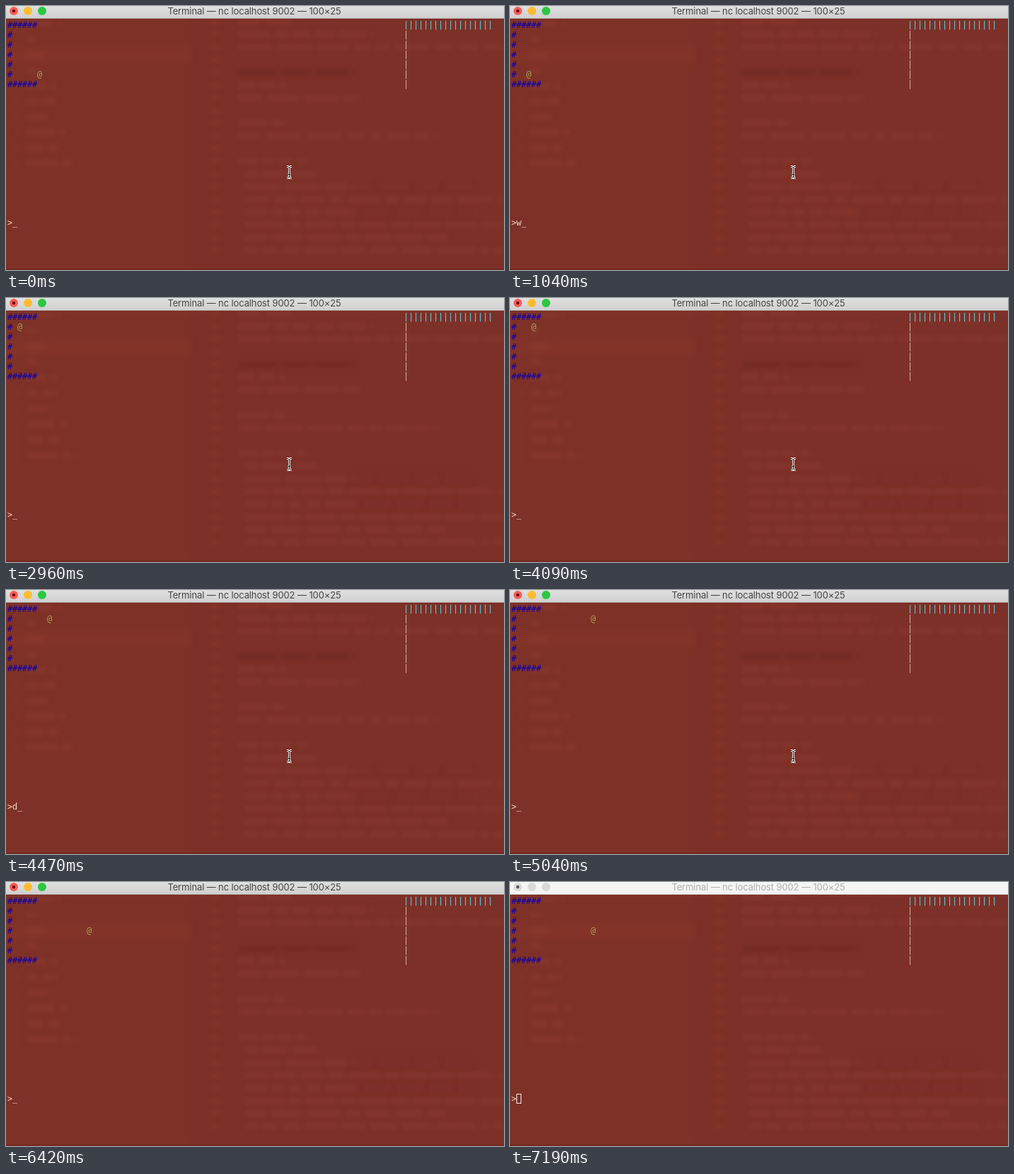
Animation, 704 px wide and 374 px high, one loop 7290 ms. Source, as an HTML page with a canvas:

```html
<!DOCTYPE html>
<html lang="en">
<head>
<meta charset="utf-8">
<title>Terminal</title>
<style>
  html, body { margin: 0; overflow: hidden; background: #7d3027; }
  canvas { display: block; }
</style>
</head>
<body>
<canvas id="stage" width="704" height="374"></canvas>
<script>
const W = 704, H = 374, LOOP = 7290;
const ctx = document.getElementById('stage').getContext('2d');
const MONO = '12px "DejaVu Sans Mono", monospace';
const STEP = { a: [-1, 0], d: [1, 0], w: [0, -1], s: [0, 1] };

// Player moves: [time, key]; a held key repeats at a fixed period.
const held = (start, period, count, key) =>
  Array.from({ length: count }, (_, i) => [start + i * period, key]);
const moves = [
  [420, 'a'], [590, 'a'], [740, 'a'], [1450, 'w'], [1690, 'w'],
  [1870, 'w'], [2040, 'w'], [2490, 'd'], [2780, 'a'], [2960, 'a'],
  [3190, 'a'], [3370, 'd'], [3550, 'd'],
  ...held(4090, 80, 5, 'd'), ...held(4520, 66, 11, 'd'),
  [5350, 's'], [5530, 's'], [5770, 'a'], [5950, 'a'], [6130, 'a']
];

// Short-lived states: [from, to, value]
const typed = [[360, 420, 'a'], [560, 590, 'a'], [1040, 1100, 'w'],
  [3490, 3550, 'd'], [4470, 4520, 'd']];
const newline = [[1510, 1570, 'w'], [4652, 4700, 'd'], [5590, 5650, 's']];
const blank = [[1570, 1630, 1], [4700, 4750, 1], [5240, 5290, 1], [5650, 5710, 1]];
const active = (list, t) => (list.find(([a, b]) => t >= a && t < b) || [])[2];

function put(text, col, row, color) {
  ctx.font = MONO;
  ctx.fillStyle = color;
  [...text].forEach((ch, i) => ctx.fillText(ch, 2 + 7 * (col + i), 31 + 14 * row));
}

function makeBackdrop() {
  const layer = document.createElement('canvas');
  layer.width = W;
  layer.height = H;
  const g = layer.getContext('2d');
  let seed = 9;
  const rnd = () => (seed = seed * 16807 % 2147483647) / 2147483647;
  const rect = (x, y, w, h, color) => { g.fillStyle = color; g.fillRect(x, y, w, h); };
  const words = (x, end, y, color) => {
    while (x < end) {
      const w = Math.min(12 + rnd() * 44, end - x);
      rect(x, y - 4, w, 8, color);
      x += w + 6;
    }
  };
  rect(0, 0, W, H, '#7d3027');
  g.filter = 'blur(3px)';
  rect(-9, 0, 272, H + 9, 'rgba(140,58,46,.12)');
  rect(-9, 57, 271, 25, 'rgba(150,60,48,.22)');
  [76, 42, 56, 44, 72, 72, 60, 85, 75, 103].forEach((end, i) => {
    const y = 25 + 22 * i;
    words(28, end, y, 'rgba(160,72,60,.3)');
    if (i > 3) rect(12, y - 3, 6, 6, 'rgba(160,72,60,.2)');
  });
  const ends = [410, 520, 704, 0, 495, 395, 500, 0, 395, 610, 0, 425, 440, 665, 704, 665, 704, 630, 704];
  ends.forEach((end, i) => {
    const y = 22 + 18 * i;
    rect(289, y - 4, 13, 8, 'rgba(150,62,44,.28)');
    words(i > 11 ? 338 : 328, end, y, i === 4 ? 'rgba(95,32,26,.35)' : 'rgba(150,66,56,.3)');
  });
  [256, 292].forEach(y => rect(492, y - 5, 170, 10, 'rgba(96,36,42,.2)'));
  g.filter = 'none';
  rect(0, 372, W, 2, 'rgba(90,25,20,.3)');
  return layer;
}
const backdrop = makeBackdrop();

function dot(x, r, color) {
  ctx.fillStyle = color;
  ctx.beginPath();
  ctx.arc(x, 7, r, 0, 7);
  ctx.fill();
}

function titleBar(focused) {
  const shade = ctx.createLinearGradient(0, 0, 0, 17);
  shade.addColorStop(0, focused ? '#e0e0e0' : '#f6f6f6');
  shade.addColorStop(1, focused ? '#d0d0d0' : '#f4f4f4');
  ctx.fillStyle = shade;
  ctx.fillRect(0, 0, W, 17);
  ctx.fillStyle = focused ? '#b3a9a7' : '#d5cccb';
  ctx.fillRect(0, 17, W, 1);
  ['#fc5b57', '#fdbc30', '#29c840'].forEach((color, i) =>
    dot(11 + 20 * i, 6, focused ? color : '#dadada'));
  dot(11, 2.2, focused ? '#6b0d0a' : '#555');
  ctx.font = '13px Inter, sans-serif';
  ctx.letterSpacing = '-0.12px';
  ctx.textAlign = 'center';
  ctx.fillStyle = focused ? '#444' : '#b0b0b0';
  ctx.fillText('Terminal — nc localhost 9002 — 100×25', 351, 12);
  ctx.textAlign = 'left';
  ctx.letterSpacing = '0px';
}

function room(t) {
  for (let row = 0; row < 7; row++) {
    put(row % 6 ? '#' : '######', 0, row, '#0c00ae');
    put('|', 80, row, row ? '#cdb9a6' : '#62cfe0');
  }
  put('|'.repeat(17), 81, 0, '#62cfe0');
  let x = 6, y = 5, color = '#a5a552';
  for (const [time, key] of moves) {
    if (time > t) break;
    const [dx, dy] = STEP[key];
    x += dx;
    y += dy;
    color = dy ? '#55dc38' : '#a5a552';
  }
  put('@', x, y, color);
}

function prompt(t) {
  const sent = active(newline, t);
  const text = sent || active(typed, t) || '';
  put('>' + text, 0, 20, '#f0d9c0');
  if (t >= 7190) {
    ctx.strokeStyle = '#f4ebe8';
    ctx.lineWidth = 1;
    ctx.strokeRect(9.5, 300.5, 6, 13);
  } else if (sent) put('_', 0, 21, '#f4ebe8');
  else put('_', 1 + text.length, 20, '#f4ebe8');
}

const beam = new Path2D('M-3.5-7.5h2l1.5 1.5l1.5-1.5h2M0-6V7M-3.5 8.5h2L0 7l1.5 1.5h2M-2 3.5h4');
function pointer(t) {
  if (t >= 6420) return;
  const [x, y] = t < 6300 ? [400.5, 235] : t < 6360 ? [385.5, 285] : [436.5, 349];
  ctx.save();
  ctx.translate(x, y);
  for (const [width, color] of [[3, '#f3f3f3'], [1, '#111']]) {
    ctx.lineWidth = width;
    ctx.strokeStyle = color;
    ctx.stroke(beam);
  }
  ctx.restore();
}

function draw(now) {
  const t = now % LOOP;
  ctx.drawImage(backdrop, 0, 0);
  titleBar(t < 7140);
  if (active(blank, t)) put('_', 0, 0, '#f4ebe8');
  else {
    room(t);
    prompt(t);
  }
  pointer(t);
}

const start = performance.now();
(function tick() {
  draw(performance.now() - start);
  requestAnimationFrame(tick);
})();
</script>
</body>
</html>
```
